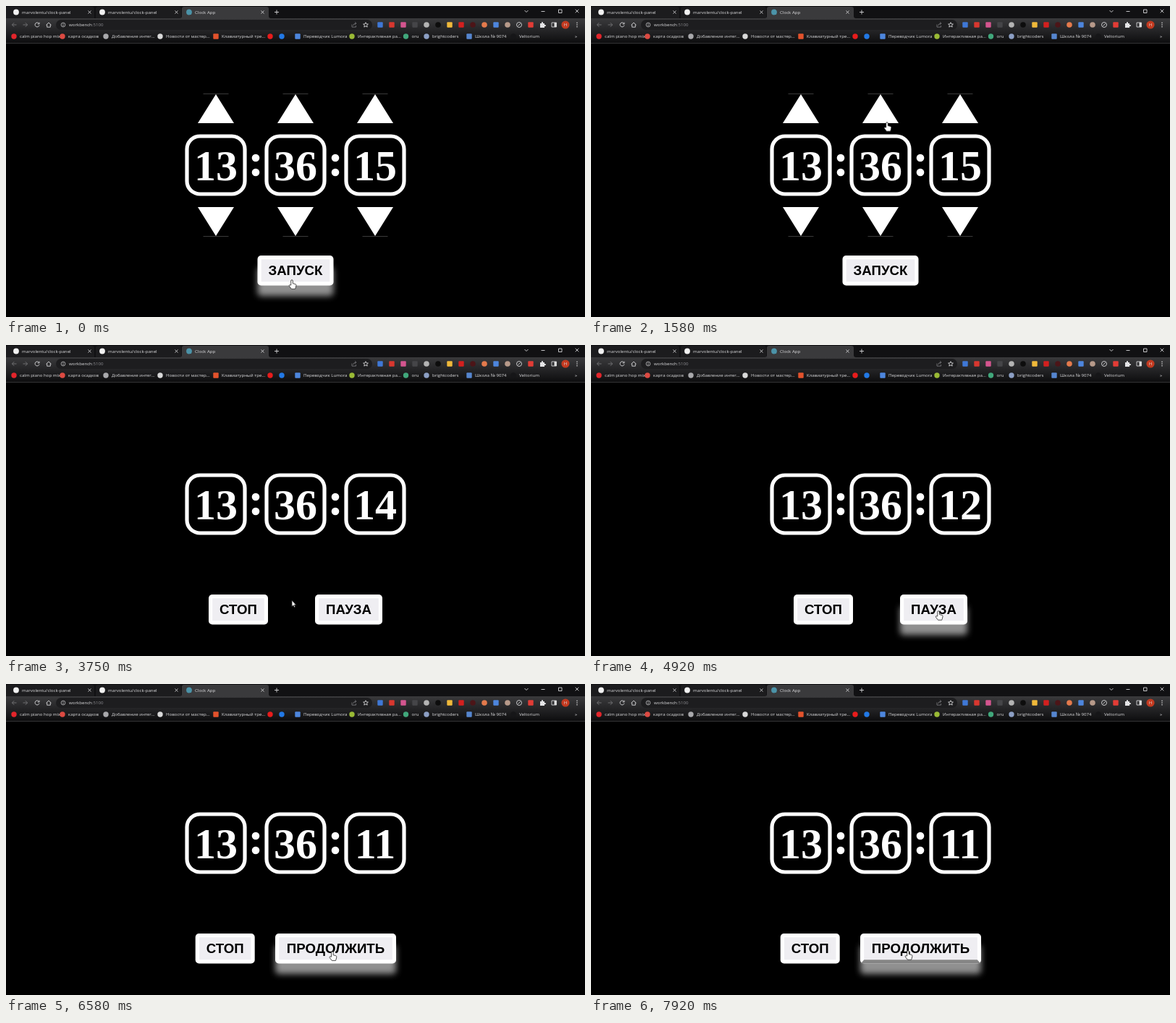
These frames come from a looping animation (800 px wide and 430 px high, 8 s). An HTML page:

```html
<!DOCTYPE html>
<html lang="ru">
<head>
<meta charset="utf-8">
<title>Timer</title>
<style>
  html, body { margin: 0; width: 100%; height: 100%; overflow: hidden; background: #000; }
  svg { display: block; width: 800px; height: 430px; }
  .ui { font: 6.15px "Open Sans", "Noto Sans", sans-serif; fill: #dcdcde; }
  .digits { font: bold 60px "Liberation Serif", serif; fill: #fff; text-anchor: middle; }
  .label { font: bold 18.67px "Liberation Sans", sans-serif; fill: #000; text-anchor: middle; }
  .line { fill: none; stroke: #d6d6d8; stroke-width: .9; }
  .dim { stroke: #77777a; }
</style>
</head>
<body>
<svg id="stage" viewBox="0 0 800 430">
  <defs>
    <linearGradient id="bar" x2="0" y2="1">
      <stop offset="0" stop-color="#3a3a3c"/>
      <stop offset=".5" stop-color="#242426"/>
      <stop offset="1" stop-color="#0d0d0e"/>
    </linearGradient>
    <filter id="blur" x="-30%" y="-60%" width="160%" height="220%">
      <feGaussianBlur stdDeviation="4.2"/>
    </filter>
  </defs>
</svg>
<script>
const LOOP = 8000;
const stage = document.getElementById('stage');

const text = (x, y, s, cls = 'ui', extra = '') => `<text x="${x}" y="${y}" class="${cls}" ${extra}>${s}</text>`;
const dot = (x, y, r, fill) => `<circle cx="${x}" cy="${y}" r="${r}" fill="${fill}"/>`;
const square = (x, y, size, fill) =>
  `<rect x="${x - size / 2}" y="${y - size / 2}" width="${size}" height="${size}" rx="1" fill="${fill}"/>`;
const line = (d, cls = '') => `<path class="line ${cls}" d="${d}"/>`;
const cross = (x, y, r) => line(`M${x - r} ${y - r}l${2 * r} ${2 * r}m0 ${-2 * r}l${-2 * r} ${2 * r}`);

function tabs() {
  const tab = (x, title, color, close) =>
    dot(x, 8.5, 3.9, color) + text(x + 8, 10.7, title) + cross(close, 8.5, 2);
  return `<rect width="800" height="18" fill="#111113"/>
    <path d="M0 17V4q0-3 3-3H119q3 0 3 3V17zM124 17V4q0-3 3-3H239q3 0 3 3V17z" fill="#1c1c1e"/>
    <path d="M240 17q3 0 3-3V4q0-3 3-3H360q3 0 3 3V14q0 3 3 3z" fill="#3a3a3c"/>`
    + tab(14, 'marvolentu/clock-panel', '#f2f2f2', 115.5)
    + tab(133, 'marvolentu/clock-panel', '#f2f2f2', 235.5)
    + tab(253, 'Clock App', '#4b93a8', 354.5)
    + line('M371 8.5h6M374 5.5v6')
    + line('M716.5 6l2.5 2.5 2.5-2.5M739.5 7.5h5M763.5 5h4.5v4.5h-4.5z')
    + cross(789, 7, 2.3);
}

function toolbar() {
  const extensions = [
    [square, '#3f78d6'], [square, '#d8372f'], [square, '#d4558f'], [square, '#454548'],
    [dot, '#b4b4b4'], [dot, '#0d0d0d'], [square, '#f0b93a'], [square, '#d3201f'],
    [dot, '#4c1518'], [dot, '#e47a4c'], [square, '#4d86dd'], [dot, '#b79a8a'],
  ];
  return `<rect y="17" width="800" height="34.5" fill="url(#bar)"/>
    <rect x="69" y="19" width="437" height="14" rx="7" fill="#1d1d1f"/>`
    + line('M14.5 26h-6m2.7-2.8L8.4 26l2.8 2.8M23.500 26h6m-2.700-2.800L29.600 26l-2.800 2.800', 'dim')
    + line('M45.600 24.300a3 3 0 1 0 .4 2.300M46 22.700v2.200h-2.200')
    + line('M55.500 26.300L59 23l3.500 3.300M56.700 25.600v3.600h4.600v-3.600')
    + `<circle class="line" cx="79" cy="26" r="2.900" style="stroke-width:.7"/>` + line('M79 25.600v2M79 24.200v.7')
    + text(87, 28.2, 'workbench<tspan fill="#8c8c90">:5100</tspan>')
    + line('M478 25.500v3.600h5.500v-2M479.800 27q.4-3 4-3m-1.600-1.700L484 24l-1.800 1.700', 'dim')
    + line('M497 22.700l1 2.200 2.400.2-1.800 1.600.6 2.400-2.200-1.300-2.200 1.300.6-2.400-1.800-1.600 2.400-.2z')
    + extensions.map(([shape, color], i) =>
        shape(517 + 16 * i, 26, shape === dot ? 3.8 : 7.4, color)).join('')
    + `<circle class="line" cx="709" cy="26" r="3.500"/>` + line('M707.500 27.500l3-3')
    + square(725, 26, 7.4, '#e23c36')
    + `<path d="M738 24h2q-.5-2 1-2t1 2h2v2q2-.5 2 1t-2 1v2h-6z" fill="#e4e4e6"/>`
    + line('M754 23h6.500v6h-6.500z') + `<path d="M757.500 23h3v6h-3z" fill="#ddd"/>`
    + dot(773, 26, 5.6, '#c33a20') + text(773, 28.2, 'Н', 'ui', 'text-anchor="middle"')
    + [23.3, 26, 28.7].map(y => dot(789, y, .8, '#ddd')).join('');
}

function bookmarks() {
  const items = [
    [11, dot, '#e3252b', 'calm piano hop mix'], [78, dot, '#dc4a42', 'карта осадков'],
    [138, dot, '#a9a9ac', 'Добавление интег...'], [213, dot, '#d9d9d9', 'Новости от мастер...'],
    [290, square, '#e2522c', 'Клавиатурный тре...'], [365, dot, '#e81c1c', ''],
    [381, dot, '#2279e6', ''], [403, square, '#4d86dd', 'Переводчик Lumora'],
    [478, dot, '#9aba35', 'Интерактивная ра...'], [552.5, dot, '#41a77b', 'oru'],
    [581, dot, '#8c9fc4', 'brightcoders'], [640, square, '#5586cf', 'Школа № 9074'],
    [701, dot, '#161618', 'Veltorium'],
  ];
  return items.map(([x, shape, color, name]) =>
    shape(x, 42, shape === dot ? 3.7 : 7.4, color) + text(x + 8, 44.1, name)).join('')
    + text(786, 44.3, '»', 'ui', 'font-weight="bold"')
    + '<path d="M0 51.500H800" stroke="#343436"/>';
}

function clock() {
  const boxes = [290, 400, 510].map((x, i) =>
    `<rect x="${x - 40}" y="180" width="80" height="80" rx="18" fill="none" stroke="#fff" stroke-width="5.200"/>`
    + text(x, 241, ['13', '36', '15'][i], 'digits', `id="d${i}"`)).join('');
  const colons = [345, 455].map(x => dot(x, 210, 5.3, '#fff') + dot(x, 230, 5.3, '#fff')).join('');
  const arrows = [290, 400, 510].map(x =>
    `<path d="M${x} 122l25 40h-50zM${x} 318l25-40h-50z" fill="#fff"/>
     <path d="M${x - 17.5} 121.500h35m-35 197h35" stroke="#4a4a4a" stroke-width=".8"/>`).join('');
  return boxes + colons + `<g id="arrows">${arrows}</g>`;
}

const scenes = [
  { from: 0, buttons: [['ЗАПУСК', 347.5, 105]] },
  { from: 2830, buttons: [['СТОП', 280, 82], ['ПАУЗА', 427, 93]] },
  { from: 5960, buttons: [['СТОП', 261.7, 82], ['ПРОДОЛЖИТЬ', 372, 167]] },
];

// The last button of each scene is the one that glows and gets pressed.
function button([name, x, w], i, all) {
  const main = i === all.length - 1;
  const glow = `<rect class="glow" x="${x}" y="361" width="${w}" height="40" rx="5" fill="#909090" filter="url(#blur)"/>`;
  const press = `<path class="press" d="M${x + .7} 386.500l4.600-5.300h${w - 10.6}l4.600 5.300z" fill="#858585"/>`;
  return (main ? glow : '')
    + `<rect x="${x}" y="345" width="${w}" height="41.500" rx="5" fill="#fff"/>
       <rect x="${x + 5.2}" y="350.200" width="${w - 10.4}" height="31" fill="#efeef2"/>`
    + (main ? press : '') + text(x + w / 2, 372.3, name, 'label');
}

stage.innerHTML += tabs() + toolbar() + bookmarks() + clock()
  + scenes.map(s => `<g class="scene">${s.buttons.map(button).join('')}</g>`).join('')
  + `<g id="cursor" fill="#fff" stroke="#222" stroke-width=".8" stroke-linejoin="round">
      <path id="hand" d="M-1.300 7V1a1.300 1.300 0 0 1 2.600 0V4.600l3.600.9q1.200.4 1 1.800L5.300 10.200 4.600 12.200H-.6L-3.700 8.200q-.6-1.100.5-1.500z"/>
      <path id="pointer" d="M0 0V8.600L2 6.900 3.300 9.700 4.600 9.100 3.300 6.400H5.800z"/>
    </g>`;

const cursorPath = [
  [0, 395, 379], [450, 396, 378], [1400, 410, 164], [1580, 409, 161], [1750, 409, 162],
  [2380, 397, 353], [2580, 397, 351], [2830, 395, 353], [3900, 395, 353],
  [4900, 480, 368], [5200, 488, 371], [6300, 488, 371], [6950, 395, 369], [7100, 395, 369],
  [7250, 412, 409], [7420, 432, 376], [7560, 438, 369], [LOOP, 438, 369],
];
const glowSteps = [
  [0, 1], [780, 1], [1020, 0], [2230, 0], [2480, 1], [2830, 1], [2830, 0], [4470, 0],
  [4750, 1], [7180, 1], [7290, .6], [7450, 1], [LOOP, 1],
];
const presses = [[2730, 2830], [5780, 5960], [7780, LOOP]];
const ticks = [2840, 3850, 4850, 5850];

function sample(steps, t) {
  const i = steps.findIndex(s => s[0] > t);
  const [a, b] = [steps[i - 1], steps[i]];
  const k = (t - a[0]) / (b[0] - a[0]);
  const e = k * k * (3 - 2 * k);
  return a.slice(1).map((v, j) => v + (b[j + 1] - v) * e);
}

const $ = id => document.getElementById(id);
const show = (el, on) => { el.style.display = on ? '' : 'none'; };
const groups = [...document.querySelectorAll('.scene')];
const glows = [...document.querySelectorAll('.glow')];
const pressEdges = [...document.querySelectorAll('.press')];

function clickable(x, y, scene) {
  const onButton = scenes[scene].buttons.some(([, left, w]) =>
    x > left && x < left + w && y > 345 && y < 386.5);
  const onArrow = scene === 0 && Math.abs(x - 400) < 25
    && (y > 122 && y < 163 || y > 278 && y < 319);
  return onButton || onArrow;
}

function render(t) {
  const scene = scenes.filter(s => s.from <= t).length - 1;
  groups.forEach((g, i) => show(g, i === scene));
  show($('arrows'), scene === 0);
  glows[scene].setAttribute('opacity', sample(glowSteps, t)[0]);
  show(pressEdges[scene], presses.some(([a, b]) => t >= a && t < b));
  $('d2').textContent = 15 - ticks.filter(at => at <= t).length;

  const [x, y] = sample(cursorPath, t);
  const hand = clickable(x, y, scene);
  $('cursor').setAttribute('transform', `translate(${x} ${y})`);
  show($('hand'), hand);
  show($('pointer'), !hand);
}

const start = performance.now();
function frame() {
  render((performance.now() - start) % LOOP);
  requestAnimationFrame(frame);
}
frame();
</script>
</body>
</html>
```
